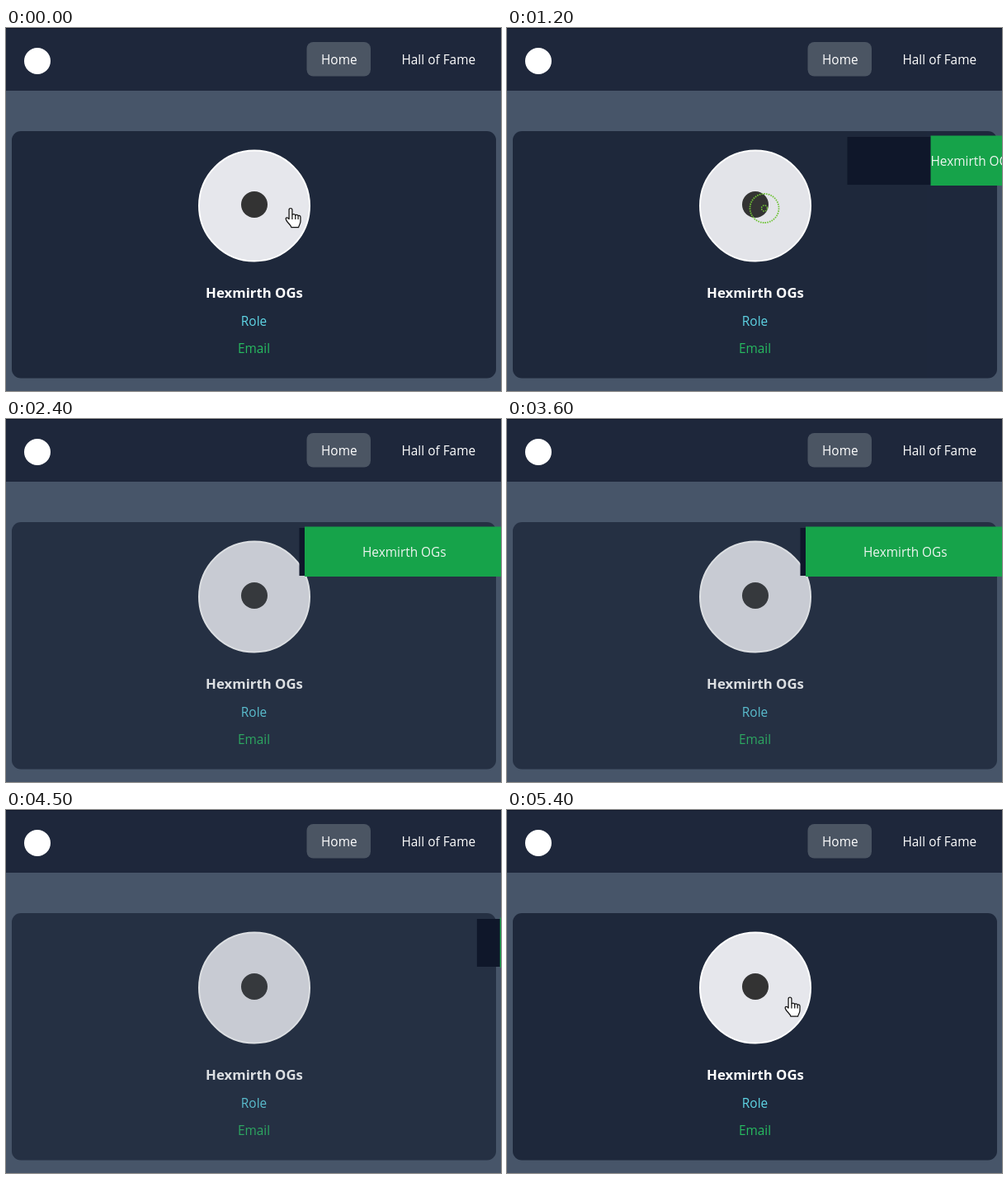
An HTML page for the animation above (5.5 s loop, 600x440 px).

```html
<!DOCTYPE html>
<html lang="en">
<head>
<meta charset="utf-8">
<title>Hexmirth OGs</title>
<style>
  html, body { margin: 0; width: 100%; height: 100%; overflow: hidden; background: #475569; }
  svg { display: block; width: 600px; height: 440px; }
  text { font: 500 15.4px "Open Sans", "Noto Sans", sans-serif; fill: #fff; text-anchor: middle; }
  .name { font-size: 16.8px; font-weight: 700; }
  .role { fill: #5fd6e6; }
  .mail { fill: #27bb60; }
  .note { fill: #eef5f0; text-anchor: start; }
</style>
</head>
<body>
<svg viewBox="0 0 600 440">
  <rect width="600" height="440" fill="#475569"/>
  <rect width="600" height="76" fill="#1e273b"/>
  <rect width="600" height="1" fill="#0f1629"/>
  <circle cx="38" cy="40" r="16" fill="#fff"/>
  <rect x="364.5" y="17" width="77.5" height="41.5" rx="8" fill="#4b5563"/>
  <text x="403.8" y="44">Home</text>
  <text x="524.3" y="44">Hall of Fame</text>

  <g id="card">
    <rect x="7" y="125" width="587" height="299.5" rx="11" fill="#1e283b"/>
    <circle cx="301" cy="215.5" r="67" fill="#e6e7ec" stroke="#fff" stroke-width="2"/>
    <circle cx="301" cy="214" r="16" fill="#333"/>
    <text class="name" x="301" y="327">Hexmirth OGs</text>
    <text class="role" x="300.5" y="361">Role</text>
    <text class="mail" x="300.5" y="394">Email</text>
  </g>

  <g id="toast">
    <rect id="back" y="132" width="260" height="58" fill="#0f172a"/>
    <rect id="front" y="130.5" width="260" height="60.5" fill="#16a34a"/>
    <text id="note" class="note" y="167">Hexmirth OGs</text>
  </g>

  <g id="ring" fill="none" stroke="#6fc236" stroke-width="1.8" stroke-dasharray="1.6 1.2">
    <circle cx="312" cy="218.5" r="17.5"/>
    <circle cx="312" cy="218.5" r="3.5" stroke-width="1.5"/>
  </g>
  <path id="hand" fill="#fff" stroke="#111" stroke-width="1.3" stroke-linejoin="round"
    d="M-2 2a2 2 0 0 1 4 0v7c0-2 4-2 4 .3c0-1.6 3.5-1.4 3.5 .8c0-1.4 3-1.2 3 1v5c0 4-2 5-2.5 8h-9c-.5-3-6.5-7-7-10.5c-.3-2 2-2.5 4 0zM2 9v5M6 9.5v4.5M9.5 10.5v3.5"/>
</svg>
<script>
const LOOP = 5500, STEP = 100;
const CLICK = 1100, LEAVE = 4000, DONE = 4600;
const el = id => document.getElementById(id);
const set = (id, name, value) => el(id).setAttribute(name, value);
const show = (id, on) => set(id, "visibility", on ? "visible" : "hidden");

// Progress from 0 to 1 over a span of time.
const ramp = (t, from, span) => Math.min(1, Math.max(0, (t - from) / span));
const smooth = u => u * u * (3 - 2 * u);

function drawToast(t) {
  const left = 1 - ramp(t, CLICK, 600);
  const exit = ramp(t, LEAVE, 530) ** 2;
  const front = 362 + 239 * left ** 2.5 + 266 * exit;
  show("toast", t > CLICK && t < DONE);
  set("back", "x", 355.5 + 245 * left ** 8 + 242 * exit);
  set("front", "x", front);
  set("note", "x", front + 70 * smooth(ramp(t, CLICK + STEP, 400)));
}

function drawHand(t) {
  const toClick = smooth(ramp(t, 0, 700));
  const back = smooth(ramp(t, DONE, 700));
  const x = 345 - 31 * toClick + 29 * back;
  const y = 218.5 - toClick + 9.5 * back;
  show("hand", t <= CLICK || t >= DONE);
  set("hand", "transform", `translate(${x} ${y}) scale(.96)`);
}

function draw(time) {
  const t = Math.floor(time % LOOP / STEP) * STEP;
  const dim = smooth(ramp(t, CLICK, 600)) - smooth(ramp(t, DONE - STEP, 600));
  set("card", "opacity", 1 - .19 * dim);
  show("ring", t > CLICK && t < CLICK + 3 * STEP);
  drawToast(t);
  drawHand(t);
}

const start = performance.now();
function tick() {
  draw(performance.now() - start);
  requestAnimationFrame(tick);
}
tick();
</script>
</body>
</html>
```
